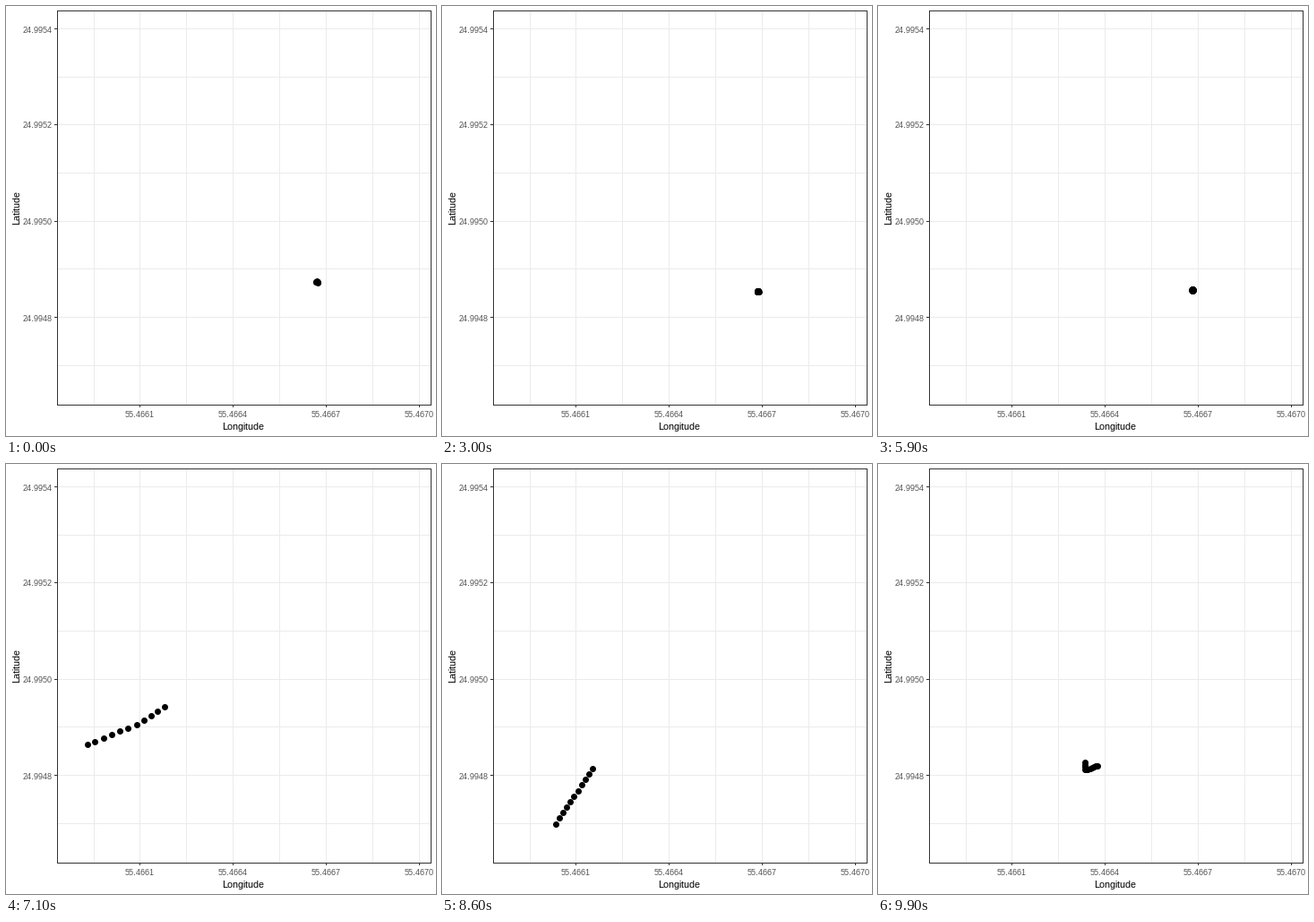
Recreate the animation shown at these times as a matplotlib script. Size 480 px wide and 480 px high, loop 10000 ms.

```python
import numpy as np
import matplotlib.pyplot as plt
from matplotlib.animation import FuncAnimation

SIZE, FRAMES, INTERVAL = 480, 100, 100
LEFT, RIGHT, TOP, BOTTOM = 57, 474, 5, 445
POINTS = 11  # position fixes shown per frame
GRID, BORDER, LABEL = "#EBEBEB", "#333333", "#4D4D4D"

plt.rcParams.update({
    "font.family": "Liberation Sans",
    "text.hinting": "default",
    "text.hinting_factor": 1,
})

# Out-and-back sprint.
HOME, CORNER = np.array([348, 311]), np.array([455, 206])
SPRINT_START, SPRINT_TIME = 45.55, 4.39

# Turning points of the lap: time in frames, x, y in pixels.
LAP = np.array([
    (66, 346, 317), (69, 270, 262), (71, 176.5, 270.5), (71.3, 152, 288),
    (71.9, 91, 313.5), (72.4, 77, 298), (76.3, 176, 26), (84.6, 95, 424),
    (86, 126.5, 401.5), (86.9, 168, 340.5), (89, 242, 205), (91, 200, 98),
    (93, 143, 200), (95.5, 200, 365), (98, 244, 292), (99, 230.5, 333),
    (99.3, 231, 342), (99.9, 244.5, 336.5),
])


def idle(t):
    """Settling, then a slow drift with a small circular tremble."""
    settle = np.exp(-t / 8)
    bump = np.exp(-((t - 17) / 2) ** 2)
    sway = t - 30.45
    turn = 2 * np.pi * t
    x = 352.6 - 7 * settle + 4 * bump + 1.5 * np.sin(0.812 * sway)
    y = 318.8 - 12.9 * settle + 5 * bump + 1.8 * np.sin(0.596 * sway)
    return np.column_stack([x + 0.7 * np.cos(turn), y + 0.7 * np.sin(turn)])


def track(t):
    place = idle(t)
    phase = (t - SPRINT_START) / SPRINT_TIME
    sprinting = (phase > 0) & (phase < 1)
    reach = np.sin(np.pi * phase[sprinting, None]) ** 2
    place[sprinting] = HOME + reach * (CORNER - HOME)
    lapping = t >= LAP[0, 0]
    for axis in (0, 1):
        place[lapping, axis] = np.interp(t[lapping], LAP[:, 0],
                                         LAP[:, axis + 1])
    return place


fig = plt.figure(figsize=(SIZE / 72, SIZE / 72), dpi=72, facecolor="white")
ax = fig.add_axes([0, 0, 1, 1])
ax.set(xlim=(0, SIZE), ylim=(SIZE, 0))
ax.axis("off")


def line(x0, y0, x1, y1, color, z):
    ax.plot([x0, x1], [y0, y1], color=color, lw=1, antialiased=False,
            solid_capstyle="projecting", zorder=z)


# Grid lines are evenly spaced; every second one carries a label.
for k in range(8):
    x, y = int(98 + 51.9 * k), int(401 - 53.65 * k)
    line(x, TOP, x, BOTTOM, GRID, 1)
    line(LEFT, y, RIGHT, y, GRID, 1)
    if k % 2:
        step = k // 2
        line(x, BOTTOM, x, BOTTOM + 2, BORDER, 3)
        line(LEFT - 3, y, LEFT, y, BORDER, 3)
        ax.text(x + 0.5, 459, f"{55.4661 + 0.0003 * step:.4f}", size=9,
                color=LABEL, ha="center", va="baseline")
        ax.text(51.5, y + 4.5, f"{24.9948 + 0.0002 * step:.4f}", size=9,
                color=LABEL, ha="right", va="baseline")

for x in (LEFT, RIGHT):
    line(x, TOP, x, BOTTOM, BORDER, 3)
for y in (TOP, BOTTOM):
    line(LEFT, y, RIGHT, y, BORDER, 3)

ax.text(264.5, 473, "Longitude", size=11, color="black",
        ha="center", va="baseline")
ax.text(15, 224.5, "Latitude", size=11, color="black", rotation=90,
        rotation_mode="anchor", ha="center", va="baseline")

dots, = ax.plot([], [], "o", ms=7, color="black", mew=0,
                antialiased=False, zorder=2)


def update(frame):
    dots.set_data(*track(frame + np.arange(POINTS) / POINTS).T)
    return dots,


anim = FuncAnimation(fig, update, frames=FRAMES, interval=INTERVAL,
                     repeat=True, repeat_delay=0)
plt.show()
```
